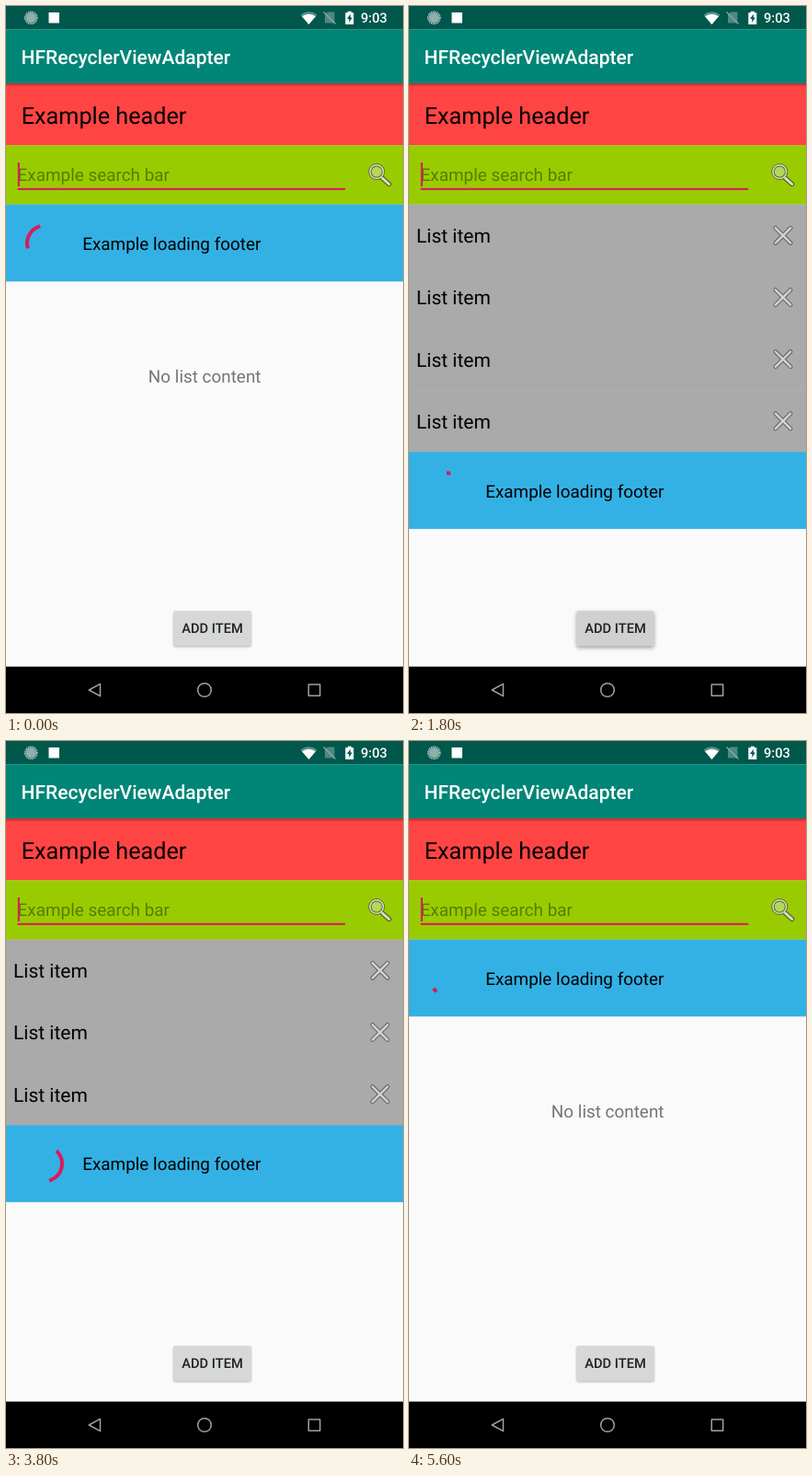
Write an HTML page that moves like this. It is 432x768 px and loops after 5.65 s.

```html
<!DOCTYPE html>
<html lang="en">
<head>
<meta charset="utf-8">
<title>List with header and footer</title>
<style>
  html, body { margin: 0; width: 100%; height: 100%; overflow: hidden; background: #fafafa; }
  svg { display: block; width: 432px; height: 768px; font-family: Roboto, sans-serif; text-rendering: geometricPrecision; }
  .medium { font-weight: 500; }
  .body { font-size: 18.9px; }
  .item { font-size: 21px; }
</style>
</head>
<body>
<svg viewBox="0 0 432 768">
  <defs>
    <linearGradient id="shade" x2="0" y2="1">
      <stop offset="0" stop-opacity=".3"/>
      <stop offset="1" stop-opacity="0"/>
    </linearGradient>
    <clipPath id="buttonClip"><rect x="182.3" y="657" width="84.4" height="38.3" rx="2"/></clipPath>
    <g id="row">
      <rect width="432" height="67.7" fill="#aaa"/>
      <text class="item" x="8" y="41.6">List item</text>
      <g fill="none" stroke-linecap="round">
        <path id="cross" d="M398.800 25.500L415.200 41.900M415.200 25.500L398.800 41.900" stroke="#686868" stroke-width="4.600"/>
        <path d="M398.800 25.500L415.200 41.900M415.200 25.500L398.800 41.900" stroke="#d4d4d4" stroke-width="2.400"/>
      </g>
    </g>
  </defs>

  <rect width="432" height="768" fill="#fafafa"/>

  <!-- status bar -->
  <rect width="432" height="25.2" fill="#00574b"/>
  <circle cx="27.300" cy="12.800" r="5.700" fill="#8fb0aa"/>
  <circle cx="27.300" cy="12.800" r="6.600" fill="none" stroke="#c5d8d4" stroke-width="1.300" stroke-dasharray="1.400 .7"/>
  <rect x="46.500" y="7" width="11.500" height="11.500" fill="#fff"/>
  <path d="M320.500 9.500Q329.500 2.800 338.500 9.500L329.500 20Z" fill="#fff" opacity=".35"/>
  <path d="M322 11.200Q329.500 6.200 337 11.200L329.500 20Z" fill="#fff"/>
  <path d="M350 6.500H357.500V18.500H347V9.500Z" fill="#fff" opacity=".3"/>
  <path d="M345.500 6.500L358.500 19.500" stroke="#8faaa5" stroke-width="1.300"/>
  <path d="M369.300 7.200H371.800V5.700H375.800V7.200H378.300V20H369.300Z" fill="#fff"/>
  <path d="M374.800 8.800L371 14H373.300V18L376.800 12.600H374.800Z" fill="#00574b"/>
  <text class="medium" x="386" y="18" font-size="14.7" fill="#fff">9:03</text>

  <!-- toolbar, header and search -->
  <rect y="25.200" width="432" height="58.800" fill="#008577"/>
  <text class="medium" x="16.600" y="63" font-size="21" fill="#fff">HFRecyclerViewAdapter</text>
  <rect y="84" width="432" height="67.500" fill="#f44"/>
  <rect y="84" width="432" height="4" fill="url(#shade)"/>
  <text x="16.800" y="127.500" font-size="25.2">Example header</text>
  <rect y="151.300" width="432" height="64.500" fill="#9c0"/>
  <text class="body" x="12.600" y="190.300" fill-opacity=".4">Example search bar</text>
  <rect x="12.600" y="197.800" width="356.600" height="2.100" fill="#d81b60"/>
  <rect id="cursor" x="12.800" y="170" width="2.100" height="26" fill="#d81b60"/>
  <g fill="none" stroke-linecap="round">
    <path d="M409.500 187L416.800 193.500" stroke="#566a20" stroke-width="5.400"/>
    <circle cx="403.300" cy="180" r="7.300" fill="#b5d65c" stroke="#566a20" stroke-width="3.400"/>
    <circle cx="403.300" cy="180" r="7.300" stroke="#d9dfcc" stroke-width="1.500"/>
    <path d="M409.500 187L416.800 193.500" stroke="#d9dfcc" stroke-width="2.800"/>
  </g>

  <!-- list -->
  <g id="rows"></g>
  <text id="empty" class="body" x="216.200" y="408.500" text-anchor="middle" fill="#757575">No list content</text>
  <g id="footer">
    <rect width="432" height="83.700" fill="#33b1e5"/>
    <text class="body" x="83.200" y="49.300">Example loading footer</text>
    <path id="spinner" fill="none" stroke="#d81b60" stroke-width="4" stroke-linecap="square"/>
  </g>

  <!-- button -->
  <rect id="button" x="182.300" y="657" width="84.400" height="38.300" rx="2" fill="#d6d7d7"/>
  <g clip-path="url(#buttonClip)">
    <rect id="tint" x="182" y="657" width="85" height="39"/>
    <circle id="ripple" cx="231" cy="665"/>
  </g>
  <text class="medium" x="224.500" y="681.300" font-size="14.7" text-anchor="middle" fill="#212121">ADD ITEM</text>

  <!-- navigation bar -->
  <rect y="717.600" width="432" height="50.400"/>
  <g fill="none" stroke="#a0a0a0" stroke-width="1.500" stroke-linejoin="round">
    <path d="M102.500 736.300V749.700L90.300 743Z"/>
    <circle cx="216" cy="743" r="7.300"/>
    <rect x="329.300" y="737" width="12.400" height="12.200"/>
  </g>
</svg>
<script>
  const LOOP = 5650, STEP = 50, RATE = 1.05;
  const CYCLE = 1333, BLINK = 500;
  const LIST_TOP = 215.6, ROW = 67.2;

  // Each change of the list restarts the spinner and the cursor.
  const changes = [
    [-7792, 0], [805, 1], [1240, 2], [1515, 3], [1788, 4], [2604, 5],
    [3370, 4], [3600, 3], [3830, 2], [4044, 1], [4292, 0]
  ];
  // press, release, circle opacity, raised
  const taps = [
    [590, 805, .06, 0],
    [1230, 1300, .05, 0],
    [1500, 1830, 0, 1],
    [2450, 2604, .06, 0]
  ];

  const el = id => document.getElementById(id);
  const clamp = x => Math.min(1, Math.max(0, x));
  const cursor = el('cursor'), empty = el('empty'), footer = el('footer');
  const spinner = el('spinner'), button = el('button'), tint = el('tint'), ripple = el('ripple');

  const rows = Array.from({ length: 5 }, (_, i) => {
    const row = document.createElementNS('http://www.w3.org/2000/svg', 'use');
    row.setAttribute('href', '#row');
    row.setAttribute('y', LIST_TOP + i * ROW);
    return el('rows').appendChild(row);
  });

  // Cubic with x controls .2, .1 and end .5; y goes from 0 to 1.
  function ease(x) {
    if (x <= 0) return 0;
    if (x >= .5) return 1;
    let lo = 0, hi = 1;
    for (let i = 0; i < 24; i++) {
      const u = (lo + hi) / 2, v = 1 - u;
      if (.6 * u * v * v + .3 * u * u * v + .5 * u ** 3 < x) lo = u; else hi = u;
    }
    return lo * lo * (3 - 2 * lo);
  }

  function arc(age) {
    const cycles = age / CYCLE, p = cycles % 1;
    const turn = 216 * cycles + 90 * p;
    const from = turn + 270 * ease(p - .5);
    const to = Math.max(turn + 270 * ease(p), from + 1);
    const point = deg => {
      const a = deg * Math.PI / 180;
      return `${(42 + 19 * Math.sin(a)).toFixed(3)} ${(42 - 19 * Math.cos(a)).toFixed(3)}`;
    };
    return `M${point(from)}A19 19 0 ${to - from > 180 ? 1 : 0} 1 ${point(to)}`;
  }

  function drawButton(t) {
    const [down, up, strength, raised] = taps.filter(tap => tap[0] <= t).pop() || [1e9, 1e9, 0, 0];
    const held = clamp((t - down) / 100), left = 1 - clamp((t - up) / 300);
    const press = held * left;
    tint.setAttribute('opacity', .03 * press);
    ripple.setAttribute('r', Math.min(24, 7 + Math.max(0, t - down) * .07));
    ripple.setAttribute('opacity', t < down ? 0 : strength * left);
    const lift = raised * press;
    button.style.filter = `drop-shadow(0 ${1 + lift * 1.5}px ${1 + lift}px rgba(0,0,0,${.28 + lift * .08}))`;
  }

  function draw(t) {
    const [since, count] = changes.filter(c => c[0] <= t).pop();
    const age = (t - since) * RATE;
    rows.forEach((row, i) => row.setAttribute('visibility', i < count ? 'visible' : 'hidden'));
    empty.setAttribute('visibility', count ? 'hidden' : 'visible');
    footer.setAttribute('transform', `translate(0 ${LIST_TOP + count * ROW})`);
    spinner.setAttribute('d', arc(age));
    cursor.setAttribute('visibility', Math.floor(age / BLINK) % 2 ? 'hidden' : 'visible');
    drawButton(t);
  }

  const start = performance.now();
  function tick() {
    const t = (performance.now() - start) % LOOP;
    draw(Math.floor(t / STEP) * STEP);
    requestAnimationFrame(tick);
  }
  tick();
</script>
</body>
</html>
```
